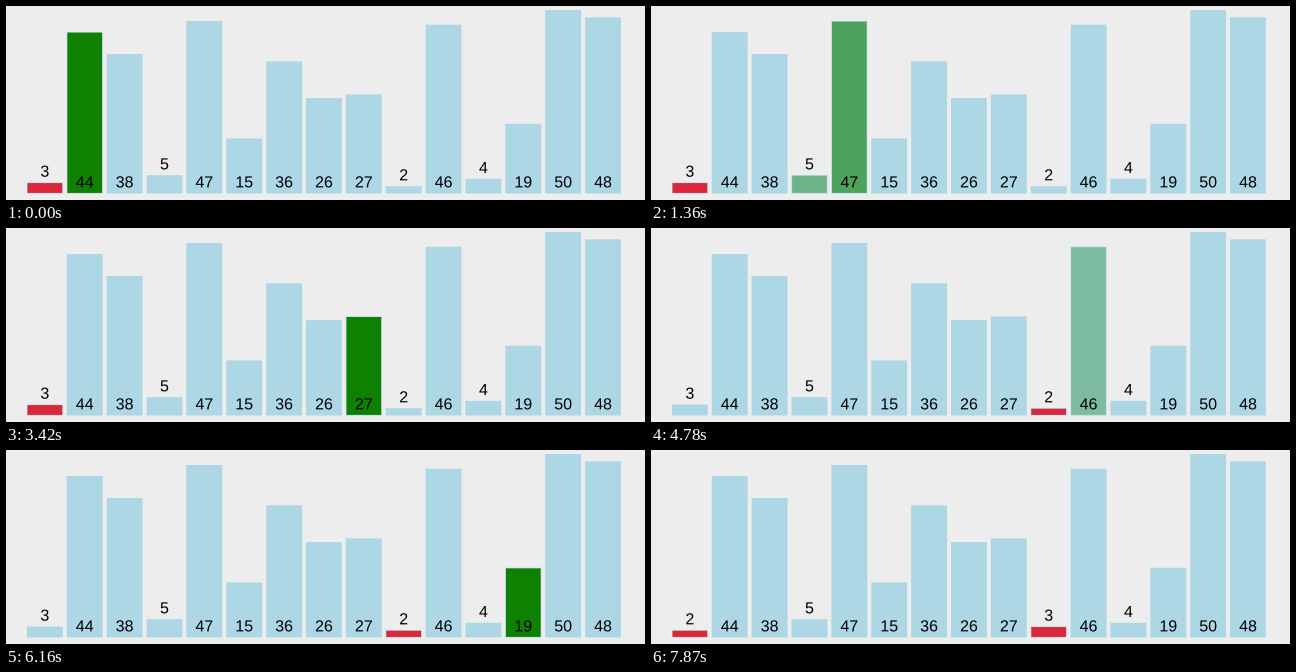
These frames come from a looping animation (639x194 px, 8000 ms). A matplotlib script:

```python
import math

import matplotlib.pyplot as plt
from matplotlib.animation import FuncAnimation
from matplotlib.patches import PathPatch, Rectangle
from matplotlib.textpath import TextPath

W, H, DPI = 639, 194, 100
LOOP, INTERVAL = 8000, 20

BACKGROUND, IDLE = "#ededed", "#aed7e6"
CURSOR, MINIMUM = "#0e8002", "#dc263a"

VALUES = [3, 44, 38, 5, 47, 15, 36, 26, 27, 2, 46, 4, 19, 50, 48]
FIRST, SMALLEST = 0, VALUES.index(min(VALUES))

LEFT, PITCH, BAR_WIDTH = 20.9, 39.87, 35.9
FLOOR, UNIT, INSET = 6.5, 3.67, 0.6
FONT_SIZE, DIGIT_ADVANCE = 16, 0.556

# The picture refreshes once per tick; the scan runs on its own clock.
TICK, TICK_OFFSET = 342.3, 10
BARS_PER_TICK = 0.687
FADE_START, FADE_LENGTH = 0.627, 0.2
FOUND, DONE, SWAP = 13, 22, 23


def scan_position(tick):
    """Bar under the cursor; the fraction is the fade into the next bar."""
    start_bar, start_tick = (SMALLEST, FOUND) if tick >= FOUND else (1, 0)
    steps = (tick - start_tick) * BARS_PER_TICK
    whole = math.floor(steps)
    fade = (steps - whole - FADE_START) / FADE_LENGTH
    return start_bar + whole + min(max(fade, 0), 1)


def minimum_bars(tick):
    if tick < FOUND:
        return {FIRST}
    return {SMALLEST} if tick < DONE else {FIRST, SMALLEST}


def bar_left(k):
    return LEFT + k * PITCH


def label_path(k, value):
    text = str(value)
    x = bar_left(k) + (BAR_WIDTH - len(text) * DIGIT_ADVANCE * FONT_SIZE) / 2
    # Short bars carry their number above the top edge.
    y = FLOOR + value * UNIT + 5.8 if value <= 5 else FLOOR + 6.1
    return TextPath((x, y), text, size=FONT_SIZE,
                    prop={"family": "Liberation Sans"})


def layout(values):
    return [(value * UNIT, label_path(k, value))
            for k, value in enumerate(values)]


swapped = VALUES.copy()
swapped[FIRST], swapped[SMALLEST] = swapped[SMALLEST], swapped[FIRST]
before, after = layout(VALUES), layout(swapped)

fig = plt.figure(figsize=(W / DPI, H / DPI), dpi=DPI, facecolor=BACKGROUND)
ax = fig.add_axes([0, 0, 1, 1])
ax.set(xlim=(0, W), ylim=(0, H))
ax.axis("off")


def add_bar(k, color, inset=0):
    return ax.add_patch(Rectangle(
        (bar_left(k) + inset, FLOOR + inset), BAR_WIDTH - 2 * inset, 0,
        facecolor=color, linewidth=0, snap=False))


bars, highlights, labels = [], [], []
for k, (_, path) in enumerate(before):
    bars.append(add_bar(k, IDLE))
    highlights.append(add_bar(k, CURSOR, INSET))
    labels.append(ax.add_patch(PathPatch(path, facecolor="black",
                                         linewidth=0, snap=False)))


def update(i):
    t = i * INTERVAL + INTERVAL / 2
    tick = math.floor((t + TICK_OFFSET) / TICK)
    position, minimum = scan_position(tick), minimum_bars(tick)
    for k, (height, path) in enumerate(after if tick >= SWAP else before):
        glow = max(0, 1 - abs(position - k)) if tick < DONE else 0
        bars[k].set_height(height)
        highlights[k].set_height(height - 2 * INSET)
        highlights[k].set_facecolor(MINIMUM if k in minimum else CURSOR)
        highlights[k].set_alpha(1 if k in minimum else glow)
        labels[k].set_path(path)
    return bars + highlights + labels


anim = FuncAnimation(fig, update, frames=LOOP // INTERVAL, interval=INTERVAL,
                     repeat=True, repeat_delay=0)
plt.show()
```
